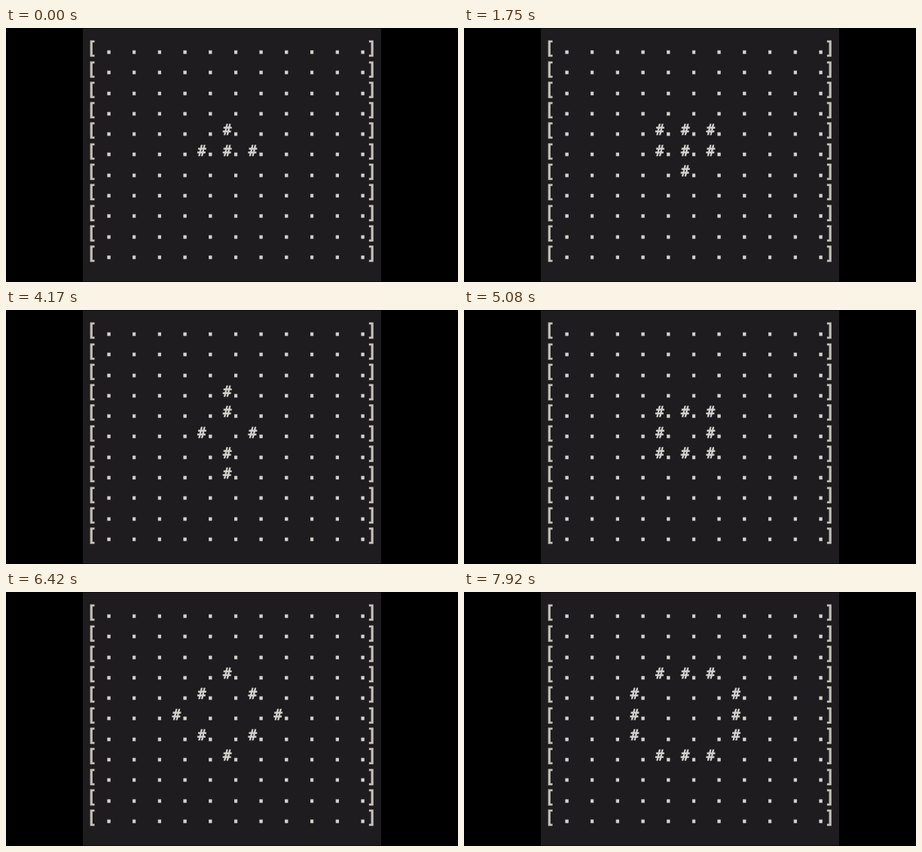
An HTML page for the animation above (8 s loop, 600 by 338 pixels).

```html
<!DOCTYPE html>
<html lang="en">
<head>
<meta charset="utf-8">
<title>Game of Life</title>
<style>
  html, body { margin: 0; width: 100%; height: 100%; overflow: hidden; background: #000; }
  svg { display: block; width: 600px; height: 338px; }
  #board { filter: blur(.5px); }
  text {
    font: 18.8px "DejaVu Sans Mono", "Liberation Mono", monospace;
    text-anchor: middle;
    fill: #d6d3d0;
    stroke: #d6d3d0;
    stroke-width: .8px;
  }
  .dot { font-weight: bold; font-size: 21px; }
  .bracket { font-size: 23px; fill: #c6c2ba; stroke: #c6c2ba; stroke-width: 1.1px; }
</style>
</head>
<body>
<svg viewBox="0 0 600 338">
  <rect x="102" y=".5" width="396" height="337" fill="#1e1c1e"/>
  <g id="board"></g>
</svg>
<script>
  const SIZE = 11, LOOP = 8000, STEP = 1100;
  const board = document.getElementById('board');
  const cellX = col => 125 + 33.7 * col;
  const baseline = row => 33 + 27.3 * row;

  function addText(char, x, y, className) {
    const node = document.createElementNS('http://www.w3.org/2000/svg', 'text');
    node.setAttribute('x', x);
    node.setAttribute('y', y);
    node.setAttribute('class', className);
    node.textContent = char;
    return board.appendChild(node);
  }

  const cells = [];
  for (let row = 0; row < SIZE; row++) {
    const y = baseline(row);
    addText('[', 114, y + 2.2, 'bracket');
    for (let col = 0; col < SIZE; col++) {
      cells.push(addText('#', cellX(col) + .2, y, 'cell'));
      addText('.', cellX(col) + 11.5, y + .9, 'dot');
    }
    addText(']', 485.4, y + 2.2, 'bracket');
  }

  function nextGeneration(grid) {
    return grid.map((alive, i) => {
      const row = Math.floor(i / SIZE), col = i % SIZE;
      let count = 0;
      for (let r = Math.max(0, row - 1); r <= Math.min(SIZE - 1, row + 1); r++)
        for (let c = Math.max(0, col - 1); c <= Math.min(SIZE - 1, col + 1); c++)
          if (r !== row || c !== col) count += grid[r * SIZE + c];
      return Number(count === 3 || (alive && count === 2));
    });
  }

  const seed = Array(SIZE * SIZE).fill(0);
  for (const [row, col] of [[4, 5], [5, 4], [5, 5], [5, 6]]) seed[row * SIZE + col] = 1;
  const generations = [seed];
  while (generations.length * STEP < LOOP) generations.push(nextGeneration(generations.at(-1)));

  let shown = -1;
  function draw() {
    const index = Math.floor(performance.now() % LOOP / STEP);
    if (index !== shown) {
      shown = index;
      cells.forEach((cell, i) => {
        cell.style.visibility = generations[index][i] ? 'visible' : 'hidden';
      });
    }
    requestAnimationFrame(draw);
  }
  draw();
</script>
</body>
</html>
```
